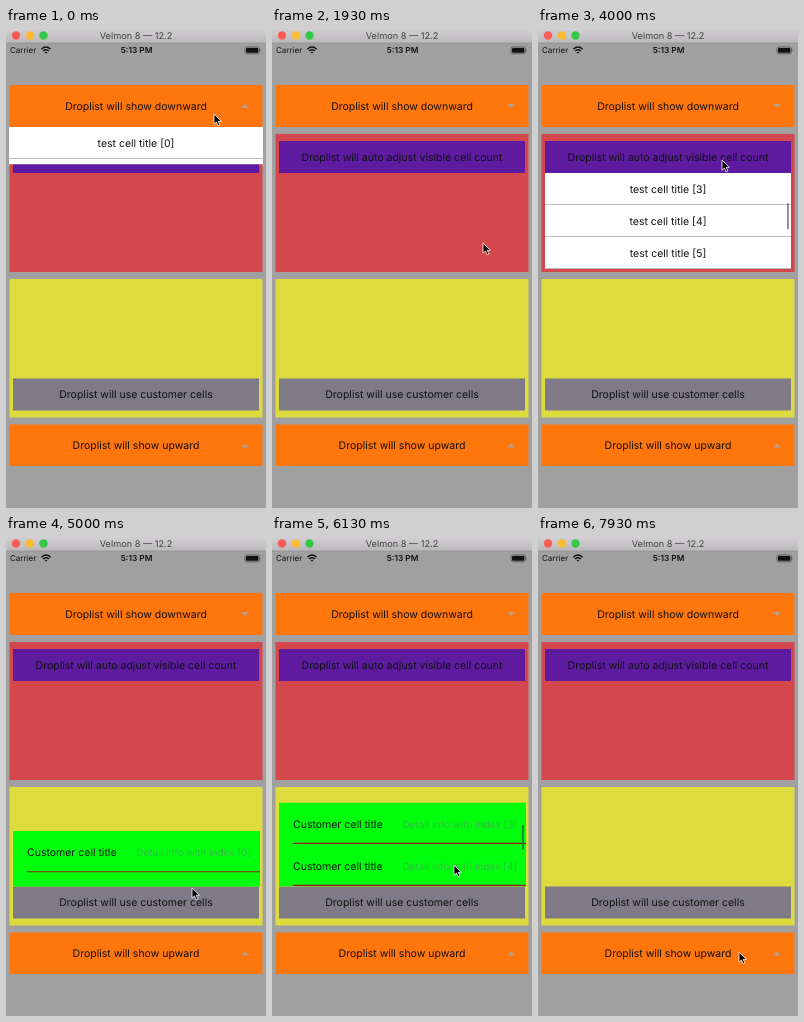
Animation, 260 px wide and 480 px high, one loop 8000 ms. Source, as an HTML page:

```html
<!DOCTYPE html>
<html lang="en">
<head>
<meta charset="utf-8">
<title>Droplist demo</title>
<style>
  html, body { margin: 0; width: 100%; height: 100%; overflow: hidden; background: #a0a0a0; }
  #stage { display: block; width: 100vw; height: 100vh; }
  text { font: 10.5px Inter, Roboto, sans-serif; fill: #111; text-rendering: geometricPrecision; }
  .mid { text-anchor: middle; }
  .bar { font-size: 9.2px; fill: #444; }
  .status { font-size: 8px; }
  .clock { font-size: 8.3px; font-weight: 600; }
  .detail { font-size: 10px; text-anchor: end; fill: #30be40; }
  .chevron { fill: #b5a08c; }
</style>
</head>
<body>
<svg id="stage" viewBox="0 0 260 480">
  <defs>
    <linearGradient id="chrome" x2="0" y2="1">
      <stop stop-color="#d3d1d3"/><stop offset="1" stop-color="#bab8ba"/>
    </linearGradient>
  </defs>
  <rect width="260" height="480" fill="#a0a0a0"/>
  <rect width="260" height="15" fill="url(#chrome)"/>
  <path d="M0 15H260" stroke="#929092" stroke-width=".7"/>
  <circle cx="10" cy="7.5" r="4.2" fill="#fc5b57"/>
  <circle cx="24" cy="7.5" r="4.2" fill="#fdbc2e"/>
  <circle cx="37.5" cy="7.5" r="4.2" fill="#34c84a"/>
  <text class="bar mid" x="130" y="11">Velmon 8 — 12.2</text>

  <text class="status" x="4" y="25.2">Carrier</text>
  <g fill="none" stroke="#111" stroke-width="1.4">
    <path d="M35.4 21.2Q40 17 44.6 21.2M37.2 23.1Q40 20.6 42.8 23.1"/>
    <path d="M38.6 24.2L40 25.8L41.4 24.2Q40 23.2 38.6 24.2Z" fill="#111" stroke="none"/>
  </g>
  <text class="status clock mid" x="130.5" y="25.2">5:13 PM</text>
  <rect x="239" y="19" width="14.4" height="6.8" rx="2" fill="none" stroke="#444" stroke-width=".7"/>
  <rect x="240" y="20" width="12.4" height="4.8" rx="1.1" fill="#111"/>
  <path d="M254.4 21.2Q255.6 22.4 254.4 23.6Z" fill="#444"/>

  <g id="panels"></g>
  <g id="lists"></g>
  <path id="cursor" d="M0 0V10.2L2.4 8L4.1 11.8L5.9 11L4.2 7.3H7.4Z"
        fill="#000" stroke="#fff" stroke-width=".8" stroke-linejoin="round"/>
</svg>
<script>
const LOOP = 8000;
const $ = id => document.getElementById(id);

function add(parent, tag, attrs, text) {
  const el = document.createElementNS('http://www.w3.org/2000/svg', tag);
  for (const key in attrs) el.setAttribute(key, attrs[key]);
  if (text) el.textContent = text;
  return parent.appendChild(el);
}

function panel(x, y, height, fill, label) {
  add($('panels'), 'rect', { x, y, width: 260 - 2 * x, height, fill });
  if (label) add($('panels'), 'text', { class: 'mid', x: 130, y: y + height / 2 + 3.8 }, label);
}

function chevron(y) {
  return add($('panels'), 'path', { class: 'chevron', d: `M235.2 ${y + 2}L239 ${y - 2}L242.8 ${y + 2}Z` });
}

panel(3.5, 57, 42, '#ff760c', 'Droplist will show downward');
panel(3.5, 106, 138, '#d4474c');
panel(7, 113, 32, '#5e1ba0', 'Droplist will auto adjust visible cell count');
panel(3.5, 251, 138.5, '#dedb3f');
panel(7, 350.5, 32, '#7e7a87', 'Droplist will use customer cells');
panel(3.5, 396.5, 41.5, '#ff760c', 'Droplist will show upward');
const topChevron = chevron(78);
chevron(417.5);

function plainCell(g, i, width) {
  const y = i * 32;
  add(g, 'text', { class: 'mid', x: width / 2, y: y + 19.8 }, `test cell title [${i}]`);
  add(g, 'path', { d: `M0 ${y + 31.5}H${width}`, stroke: '#bcbcbc' });
}

function customCell(g, i, width) {
  const y = i * 42;
  add(g, 'text', { x: 14, y: y + 25 }, 'Customer cell title');
  add(g, 'text', { class: 'detail', x: 238, y: y + 25 }, `Detail info with index [${i}]`);
  add(g, 'path', { d: `M14 ${y + 40.9}H${width}`, stroke: '#9a1c0c', 'stroke-width': 1.2 });
}

// open, close: [start, end]; scroll: [start, end, distance]
const lists = [
  { x: 3, y: 99, width: 254, height: 160, row: 32, fill: '#fff', cell: plainCell, thumb: '#808080',
    open: [-93, 207], close: [1310, 1610], scroll: [260, 710, 160] },
  { x: 7, y: 145, width: 246, height: 96, row: 32, fill: '#fff', cell: plainCell, thumb: '#808080',
    open: [2420, 2720], close: [4080, 4380], scroll: [3180, 3680, 96] },
  { x: 7, y: 350.5, width: 247, height: 84, row: 42, fill: '#00ff0c', cell: customCell, thumb: '#168a1c', up: true,
    open: [4818, 5118], close: [6820, 7120], scroll: [5450, 6080, 126] }
];

for (const list of lists) {
  const { x, y, width, height, row } = list;
  list.box = add($('lists'), 'svg', { x, y, width, height: 0, overflow: 'hidden' });
  add(list.box, 'rect', { width, height, fill: list.fill });
  list.rows = add(list.box, 'g', {});
  for (let i = 0; i < 10; i++) list.cell(list.rows, i, width);
  list.thumbHeight = Math.max(25, height * height / (row * 10) - 2);
  list.bar = add(list.box, 'rect', {
    x: width - 4, width: 1.8, rx: .9, height: list.thumbHeight, fill: list.thumb
  });
}

const ramp = (t, a, b) => Math.min(1, Math.max(0, (t - a) / (b - a)));
const ease = (t, a, b) => { const p = ramp(t, a, b); return p * p * (3 - 2 * p); };

// time, x, y of the pointer tip
const path = [
  [0, 208, 86], [80, 208, 86], [330, 183, 149], [960, 183, 149],
  [1260, 206, 86], [1400, 206, 86], [1850, 211, 215], [1990, 211, 215],
  [2340, 188, 132], [2520, 188, 132], [2900, 165, 183], [3700, 165, 183],
  [4000, 184, 132], [4180, 184, 132], [4700, 186, 352], [5060, 186, 352],
  [5400, 182, 329], [6250, 182, 329], [6650, 187, 360], [6950, 187, 360],
  [7800, 201, 416], [8000, 201, 416]
];

function pointer(t) {
  const i = path.findIndex(p => p[0] > t);
  const [a, b] = [path[i - 1], path[i]];
  const k = ease(t, a[0], b[0]);
  return [1, 2].map(n => a[n] + (b[n] - a[n]) * k);
}

function drawList(list, t) {
  const shown = ease(t, ...list.open) - ease(t, ...list.close);
  const height = list.height * shown;
  list.box.setAttribute('height', height);
  if (list.up) list.box.setAttribute('y', list.y - height);

  const [start, end, distance] = list.scroll;
  const p = ramp(t, start, end);
  const offset = distance * (1 - (1 - p) ** 3);
  list.rows.setAttribute('transform', `translate(0 ${-offset})`);

  const range = list.row * 10 - list.height;
  const travel = list.height - 2 - list.thumbHeight;
  list.bar.setAttribute('y', 1 + travel * offset / range);
  list.bar.setAttribute('opacity', ramp(t, start - 20, start + 60) * (1 - ramp(t, end + 300, end + 550)));
}

function draw(t) {
  for (const list of lists) drawList(list, t);
  const open = t < lists[0].close[0];
  topChevron.setAttribute('transform', open ? '' : 'rotate(180 239 78)');
  $('cursor').setAttribute('transform', `translate(${pointer(t)})`);
}

const began = performance.now();
function tick() {
  draw((performance.now() - began) % LOOP);
  requestAnimationFrame(tick);
}
tick();
</script>
</body>
</html>
```
